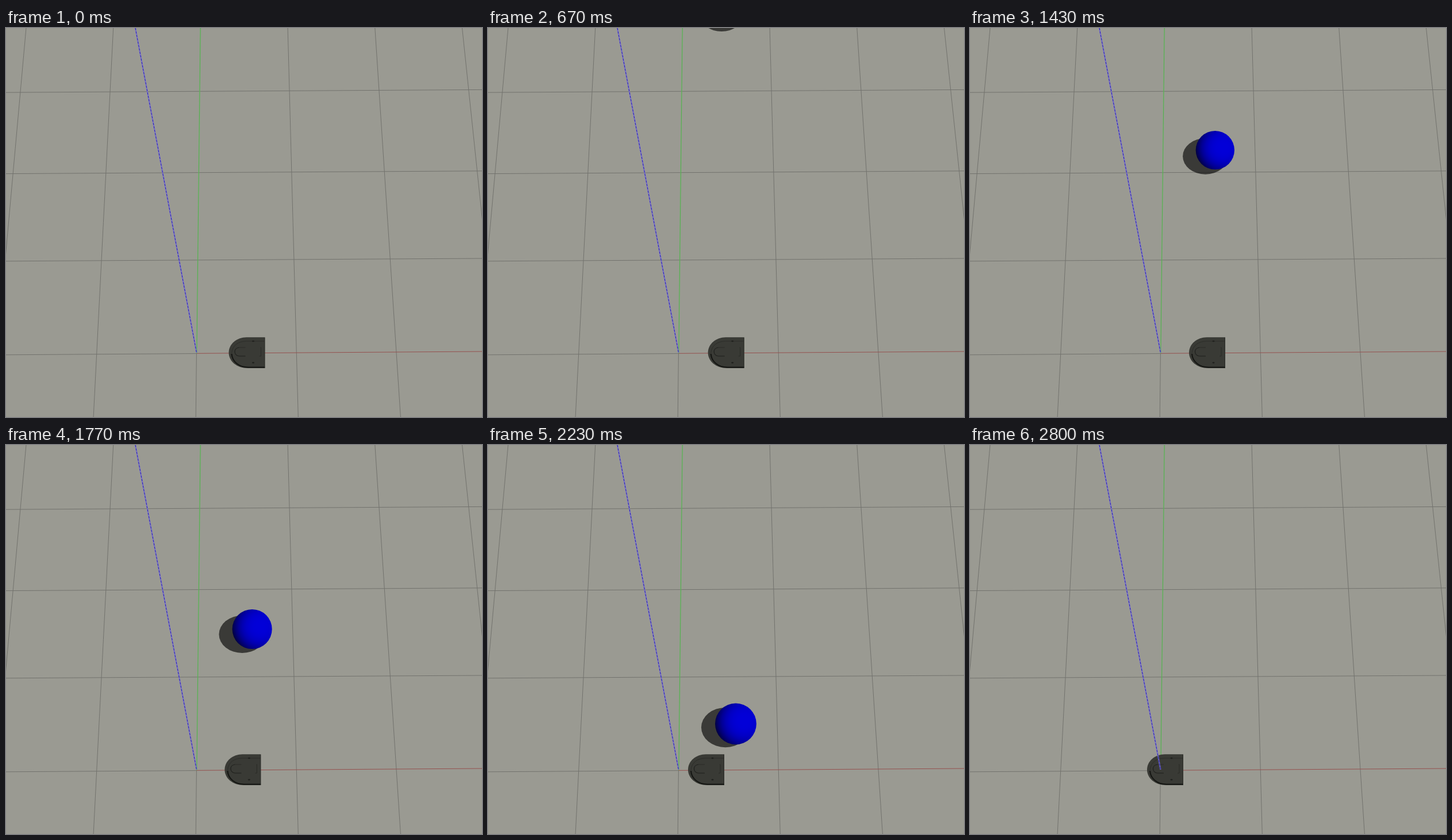
An HTML page with a canvas for the animation above (4310 ms loop, 828x677 px).

```html
<!DOCTYPE html>
<html lang="en">
<head>
<meta charset="utf-8">
<title>Dodging robot</title>
<style>
html, body { margin: 0; width: 100%; height: 100%; overflow: hidden; background: #9a9a92; }
canvas { display: block; }
</style>
</head>
<body>
<canvas id="stage" width="828" height="677"></canvas>
<script>
const ctx = document.getElementById("stage").getContext("2d");
const LOOP = 4310, FRAME = 100 / 3, MOTION_END = 2800;
const BALL_START = 560, BALL_END = 2495;

// Turning points: [time, left edge] and [time, centre height].
const robotPath = [[0, 387.5], [490, 369], [670, 383], [1033, 385.5], [1433, 381], [1640, 390], [2800, 308]];
const ballPath = [[567, -75], [667, -37], [1033, 75], [1433, 212.5], [2067, 431], [2500, 600]];

// The simulation runs in bursts of 495 ms with a short rest after each.
function simTime(time) {
  const t = Math.max(0, time - 35);
  return Math.floor(t / 535) * 495 + Math.min(t % 535, 495);
}

function along(path, time) {
  const next = Math.max(1, path.findIndex(([t]) => t >= time));
  const [[t0, v0], [t1, v1]] = path.slice(next - 1, next + 1);
  const start = simTime(t0);
  return v0 + (v1 - v0) * (simTime(time) - start) / (simTime(t1) - start);
}

function line(color, width, x1, y1, x2, y2) {
  ctx.strokeStyle = color;
  ctx.lineWidth = width;
  ctx.beginPath();
  ctx.moveTo(x1, y1);
  ctx.lineTo(x2, y2);
  ctx.stroke();
}

function ellipse(fill, x, y, rx, ry = rx) {
  ctx.fillStyle = fill;
  ctx.beginPath();
  ctx.ellipse(x, y, rx, ry, 0, 0, Math.PI * 2);
  ctx.fill();
}

function drawGround() {
  const grid = "#72726d";
  ctx.fillStyle = "#9a9a92";
  ctx.fillRect(0, 0, 828, 677);
  for (let i = 0; i < 6; i++) {
    const top = 35 + 151.7 * i, bottom = -26 + 178.1 * i;
    // The third line carries the green axis above the origin.
    if (i === 2) line(grid, 1, 331.4, 566, bottom, 677);
    else line(grid, 1, top, 0, bottom, 677);
  }
  for (let i = 0; i < 4; i++) {
    const y = 112.2 + i * (136 + 5.4 * i);
    line(grid, 1, 0, y, i < 3 ? 828 : 331.5, i < 3 ? y - 4.8 : y - 2.2);
  }
  line("#94504e", 1, 331.5, 566.3, 828, 563);
  line("rgba(115,190,110,.4)", 2.2, 338.2, 0, 331.8, 566);
  line("#55ac50", 1, 338.2, 0, 331.8, 566);
}

function drawRobot(left) {
  ctx.save();
  ctx.translate(left, 538);
  const body = new Path2D("M63 .3H31C14 .3 0 12 0 27S14 54 33 54H63Z");
  ctx.fillStyle = "#393a35";
  ctx.fill(body);
  ctx.clip(body);
  const detail = (color, width, path) => {
    ctx.strokeStyle = color;
    ctx.lineWidth = width;
    ctx.stroke(new Path2D(path));
  };
  detail("#151613", 2.2, "M5 29C6 43 18 52.5 34 52.5H63");
  detail("#2c2d29", 1, "M5 28C6 14 17 7 31 7H62M62.5 1V53");
  detail("#1e1f1c", 1.2, "M29 33H18C8 32 8 19 18 18");
  detail("#2a2b27", 1, "M18 18H29M55 18H56V33H53");
  ellipse("#20211e", 42.5, 7, 2, 1.2);
  ellipse("#20211e", 42.5, 44.5, 2, 1.2);
  ctx.restore();
}

function drawBlueAxis() {
  line("rgba(122,114,210,.75)", 2.4, 225, 0, 331.5, 565);
  ctx.setLineDash([4, 2]);
  line("#2a20b4", 1, 225, 0, 331.5, 565);
  ctx.setLineDash([]);
}

function drawBall(y) {
  const push = Math.max(0, y - 520) * .15;
  const x = 422.7 + .017 * y + push;
  const r = 31.9 + .0083 * y;
  ellipse("rgba(0,0,0,.62)", x - r / 2, y + 14.2 - .0165 * y, 1.17 * r - .6 * push, 28.8 + .012 * y);

  const lightX = x + r * .42, lightY = y - r * .15;
  const shade = ctx.createRadialGradient(lightX, lightY, 0, lightX, lightY, r * 1.45);
  for (let i = 0; i <= 8; i++) {
    const distance = i / 8;
    shade.addColorStop(distance, `rgb(2,0,${Math.round(216 - 156 * distance ** 3)})`);
  }
  ellipse(shade, x, y, r);
}

function draw() {
  const elapsed = performance.now() % LOOP;
  const time = Math.min(MOTION_END, Math.floor((elapsed + 3.5) / FRAME) * FRAME);
  drawGround();
  drawRobot(along(robotPath, time));
  drawBlueAxis();
  if (time > BALL_START && time < BALL_END) drawBall(along(ballPath, time));
  requestAnimationFrame(draw);
}
draw();
</script>
</body>
</html>
```
